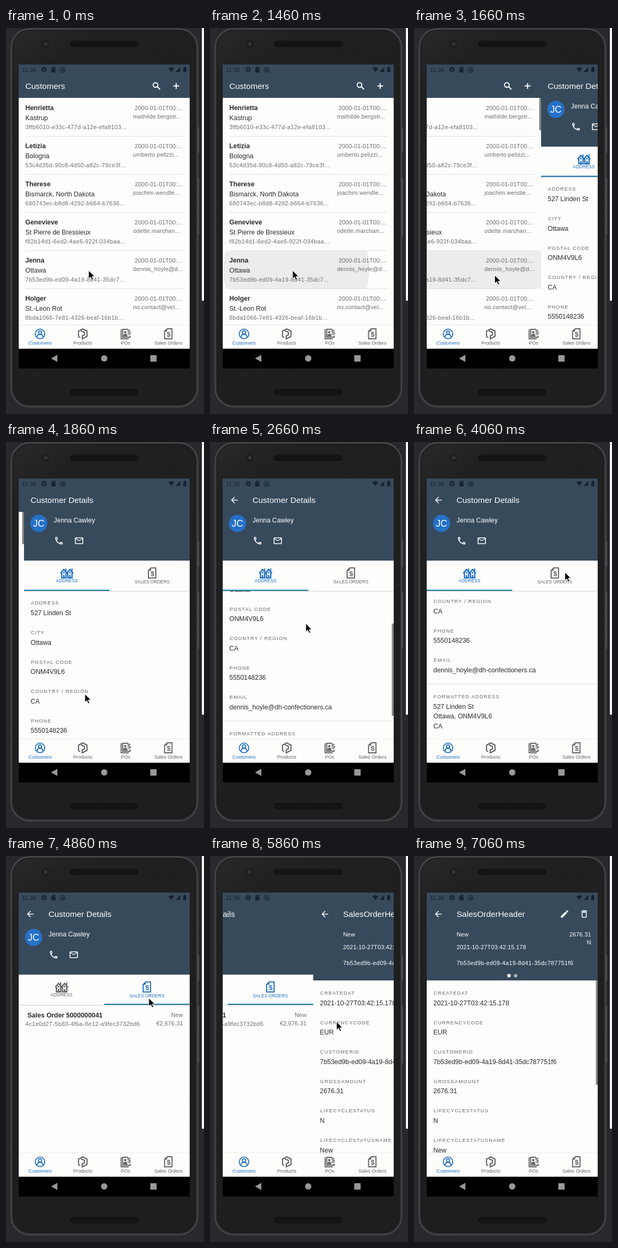
An HTML page that plays this animation: 374 px wide and 729 px high, repeating every 7.4 s.

```html
<!DOCTYPE html>
<html lang="en">
<head>
<meta charset="utf-8">
<title>Customer app demo</title>
<style>
html, body { margin: 0; width: 100%; height: 100%; overflow: hidden; background: #29292d; }
svg { display: block; width: 374px; height: 729px; }
text { font: 12.4px "Liberation Sans", Arial, sans-serif; fill: #2b2b2b; white-space: pre; }
.title { font-size: 15.5px; fill: #fff; }
.bold { font-weight: bold; }
.small { font-size: 11px; letter-spacing: .38px; fill: #6c6d6e; }
.side { font-size: 11px; letter-spacing: .18px; fill: #6c6d6e; }
.label { font-size: 9.4px; letter-spacing: 1.17px; fill: #646566; }
.white { fill: #fff; }
.initials { font-size: 17.5px; fill: #fff; }
.clock { font-size: 11px; fill: #17222d; }
.tab { font-size: 8.5px; fill: currentColor; }
.nav { font-size: 9.1px; fill: currentColor; }
.dollar { font-size: 12.5px; font-weight: bold; fill: currentColor; }
</style>
</head>
<body>
<svg id="stage" viewBox="0 0 374 729"></svg>
<script>
const LOOP = 7400, STEP = 200, LEAD = 60;
const LEFT = 24, TOP = 69, WIDTH = 323, RIGHT = 347;
const NAVY = '#374a5c', PAPER = '#fdfdfc', BLUE = '#1f70c1', GREY = '#626364', INK = '#17222d';

const text = (x, y, s, cls = '', anchor = 'start') =>
  `<text x="${x}" y="${y}" class="${cls}" text-anchor="${anchor}">${s}</text>`;
const rect = (x, y, w, h, fill, more = '') =>
  `<rect x="${x}" y="${y}" width="${w}" height="${h}" fill="${fill}" ${more}/>`;
const circle = (x, y, r, fill, more = '') =>
  `<circle cx="${x}" cy="${y}" r="${r}" fill="${fill}" ${more}/>`;
const ring = (x, y, r, color, w, more = '') =>
  circle(x, y, r, 'none', `stroke="${color}" stroke-width="${w}" ${more}`);
const line = (d, color, w = 2) =>
  `<path d="${d}" fill="none" stroke="${color}" stroke-width="${w}"/>`;
const shape = (d, color) => `<path d="${d}" fill="${color}"/>`;
const group = (id, body) => `<g id="${id}">${body}</g>`;
const at = (x, y, body, scale = 1) => `<g transform="translate(${x} ${y}) scale(${scale})">${body}</g>`;
const clip = (id, x, y, w, h) => `<clipPath id="${id}">${rect(x, y, w, h, '#000')}</clipPath>`;
const clipped = (id, body) => `<g clip-path="url(#${id})">${body}</g>`;
const ripple = (id, x, y, r) => clipped(id + 'Clip', circle(x, y, r, '#ececec', `id="${id}Ripple"`));
const bar = (id, y, h) => rect(RIGHT - 3.5, y, 3.5, h, '#858585', `id="${id}"`);

// Icons on a 24 unit grid, centred on x, y
const GLYPH = {
  back: 'M20 11H7.8l5.6-5.6L12 4l-8 8 8 8 1.4-1.4L7.8 13H20z',
  phone: 'M6.5 5c.1.9.2 1.8.5 2.6L5.8 8.8C5.4 7.6 5.1 6.3 5 5zm9.9 12c.9.3 1.7.4 2.6.5V19c-1.3-.1-2.6-.4-3.8-.8zM7.5 3H4c-.6 0-1 .4-1 1 0 9.4 7.6 17 17 17 .6 0 1-.4 1-1v-3.5c0-.6-.4-1-1-1-1.2 0-2.5-.2-3.6-.6-.3-.1-.7 0-1 .2l-2.2 2.2c-2.8-1.5-5.2-3.8-6.6-6.6l2.2-2.2c.3-.3.4-.7.2-1C8.7 6.5 8.5 5.3 8.5 4c0-.6-.4-1-1-1z',
  mail: 'M22 6a2 2 0 0 0-2-2H4a2 2 0 0 0-2 2v12a2 2 0 0 0 2 2h16a2 2 0 0 0 2-2zm-2 0-8 5-8-5zm0 12H4V8l8 5 8-5z',
  pen: 'M3 17.2V21h3.8L17.8 9.9l-3.7-3.7zM20.7 7a1 1 0 0 0 0-1.4l-2.3-2.3a1 1 0 0 0-1.4 0l-1.8 1.8 3.7 3.7z',
  bin: 'M6 19a2 2 0 0 0 2 2h8a2 2 0 0 0 2-2V7H6zM8 9h8v10H8zM15.5 4l-1-1h-5l-1 1H5v2h14V4z'
};
const icon = (name, x, y) => at(x, y,
  `<path d="${GLYPH[name]}" transform="translate(-12 -12)" fill="#fff" fill-rule="evenodd"/>`, .786);

const docIcon = (x, y) => at(x, y,
  line('M-7-4.5-2-9.5H7V9.5H-7z', 'currentColor', 2) + shape('M-7.5-4.2-2-10v5.8z', 'currentColor') +
  text(.8, 5.8, '$', 'dollar', 'middle'));
const house = x => at(x, 0,
  line('M-6.3.3 0-7 6.3.3M-4-1V8.8H4V-1', 'currentColor', 2.4) + line('M4-3.500V-9', 'currentColor', 2) +
  line('M0 9V3.5', 'currentColor', 2.6) + circle(0, -1, 1.6, 'currentColor'));
const houseIcon = (x, y) => at(x, y, house(-5.7) + house(5.7));

function phone() {
  const speaker = y => rect(121, y, 129, 11.5, '#0d0d0e', 'rx="5.5"') +
    rect(122, y + 1, 127, 9.5, 'url(#mesh)', 'rx="4.5"');
  const button = (y, h) => rect(361.5, y, 3.2, h, '#4a4a4c', 'rx="1"');
  return rect(0, 0, 374, 729, '#29292d') + rect(370, 0, 4, 515, '#f7f7f7') +
    button(187, 49) + button(283, 108) +
    rect(9.5, 1.5, 352.5, 714, '#303032', 'rx="35" stroke="#555557" stroke-width="1.3"') +
    rect(13.5, 4.5, 344.5, 707, 'url(#shell)', 'rx="31" stroke="#161617"') +
    speaker(24) + speaker(682) +
    circle(75, 30, 6, '#252528', 'stroke="#111"') + circle(75, 30, 2.5, '#3a3a3e') +
    rect(LEFT, TOP, WIDTH, 574, '#000');
}

const CUSTOMERS = [
  ['Henrietta', 'Kastrup', '3ffb6010-e33c-477d-a12e-efa8103...', 'mathilde.bergstr...'],
  ['Letizia', 'Bologna', '53c4d35d-90c8-4d50-a82c-79ce3f...', 'umberto.pelizzi...'],
  ['Therese', 'Bismarck, North Dakota', '680743ec-b8d8-4292-b664-b7636...', 'joachim.wendle...'],
  ['Genevieve', 'St Pierre de Bressieux', 'f82b14d1-6ed2-4ae6-922f-034baa...', 'odette.marchan...'],
  ['Jenna', 'Ottawa', '7b53ed9b-ed09-4a19-8d41-35dc7...', 'dennis_hoyle@d...'],
  ['Holger', 'St.-Leon Rot', '8bda1066-7e81-4326-beaf-16b1b...', 'no.contact@vel...']
];

function listPage() {
  const rows = CUSTOMERS.map(([name, city, id, mail], i) => {
    const y = 132.5 + 72 * i;
    return text(36.5, y + 22.5, name, 'bold') + text(36.5, y + 41.5, city) +
      text(36.5, y + 58.5, id, 'small') + text(333.5, y + 22.5, '2000-01-01T00:...', 'side', 'end') +
      text(240, y + 38.5, mail, 'side') + rect(37, y + 71.5, 298, 1, '#dfdfdf');
  }).join('');
  return rect(LEFT, 132, WIDTH, 430, PAPER) + ripple('row', 163, 456, 138) + rows +
    rect(LEFT, TOP, WIDTH, 63, NAVY) + text(36.5, 115, 'Customers', 'title') +
    line('M286.2 111.2 291 116', '#fff', 2.2) + ring(282.4, 107.6, 4.4, '#fff', 1.9) +
    line('M316 109.5h11M321.5 104v11', '#fff') + bar('listBar', 132, 61);
}

const fields = (list, top) => list.map(([label, value], i) => {
  const y = top + 55.6 * i;
  return text(37, y + 3.4, label, 'label') + text(36.5, y + 23, value);
}).join('');

function detailPage() {
  const address = fields([
    ['ADDRESS', '527 Linden St'], ['CITY', 'Ottawa'], ['POSTAL CODE', 'ONM4V9L6'],
    ['COUNTRY / REGION', 'CA'], ['PHONE', '5550148236'],
    ['EMAIL', 'dennis_hoyle@dh-confectioners.ca']], 304) +
    rect(LEFT, 626.5, WIDTH, 1, '#dedede') + text(37, 654.4, 'FORMATTED ADDRESS', 'label') +
    ['527 Linden St', 'Ottawa, ONM4V9L6', 'CA'].map((s, i) => text(36.5, 673.7 + 18.4 * i, s)).join('');
  const orders = ripple('order', 220, 307, 125) +
    text(182.5, 304.5, 'Sales Order 5000000041', 'bold', 'end') +
    text(36.5, 321, '4c1e0d27-5b83-4f6a-8e12-a9fec3732bd6', 'small') +
    text(334.5, 304, 'New', 'side', 'end') + text(334.5, 320, '€2,676.31', 'side', 'end');
  return rect(LEFT, 224, WIDTH, 338, PAPER) +
    clipped('bodyClip', group('address', address) + group('orders', orders)) +
    bar('detailBar', 281, 174) +
    rect(LEFT, 224, WIDTH, 57, PAPER) + rect(LEFT, 281, WIDTH, 1.5, '#000', 'opacity=".13"') +
    ripple('tab', 275, 250, 62) +
    group('tabA', houseIcon(105, 247.7) + text(104.8, 265.2, 'ADDRESS', 'tab', 'middle')) +
    group('tabB', docIcon(266, 247.3) + text(266, 267, 'SALES ORDERS', 'tab', 'middle')) +
    rect(LEFT, 279, 161.5, 2.2, '#1f7ba3', 'id="marker"') +
    rect(LEFT, TOP, WIDTH, 155, NAVY) +
    group('detailBack', icon('back', 46, 109.7)) +
    group('detailTitle', text(80.3, 115, 'Customer Details', 'title')) +
    circle(52, 153.7, 16.2, '#2571c8') + text(52, 160, 'JC', 'initials', 'middle') +
    text(80.3, 151.7, 'Jenna Cawley', 'white') + icon('phone', 90, 186.5) + icon('mail', 128, 186.5);
}

function orderPage() {
  const stamp = '2021-10-27T03:42:15.178', id = '7b53ed9b-ed09-4a19-8d41-35dc787751f6';
  return rect(LEFT, 235, WIDTH, 327, PAPER) +
    fields([['CREATEDAT', stamp], ['CURRENCYCODE', 'EUR'], ['CUSTOMERID', id],
      ['GROSSAMOUNT', '2676.31'], ['LIFECYCLESTATUS', 'N'], ['LIFECYCLESTATUSNAME', 'New']], 258.5) +
    bar('orderBar', 235, 197) + rect(LEFT, TOP, WIDTH, 166, NAVY) +
    icon('back', 46, 109.7) + text(80.5, 115, 'SalesOrderHeader', 'title') +
    icon('pen', 284.5, 109.5) + icon('bin', 321.5, 109.5) +
    text(80.5, 151.5, 'New', 'side white') + text(80.5, 176.3, stamp, 'side white') +
    text(80.5, 206.3, id, 'small white') + text(334.5, 151.5, '2676.31', 'side white', 'end') +
    text(334.5, 167.3, 'N', 'side white', 'end') +
    circle(179.5, 226, 3.3, '#fff') + circle(192, 226, 3.3, '#a9b0b6');
}

function chrome() {
  const status = rect(LEFT, TOP, WIDTH, 18, NAVY) + text(30, 82.7, '11:36', 'clock') +
    ring(72, 78.7, 2.9, INK, 2) + ring(72, 78.7, 4.5, INK, 1.6, 'stroke-dasharray="2.3 2.41"') +
    shape('M88 73.5h5.5V84h-8V76z', INK) + line('M88.5 75v2M90.3 75v2M92 75v2', NAVY, .8) +
    ring(107, 78.7, 4.7, INK, 1.2) + ring(107, 78.7, 1.8, INK, 1.2) + line('M108.5 80.2 111 82.5', INK, 1.2) +
    shape('M306.8 76.2q5.5-4 11 0L312.3 83zM329 74v9h-9z', INK) +
    shape('M334.8 74.5h1.5v-1.2h2.6v1.2h1.5v9h-5.600z', INK);

  const person = ring(64.3, 575, 3.1, BLUE, 1.8) + line('M58.8 583.5q.5-5 5.5-5t5.5 5', BLUE, 1.8) +
    ring(64.3, 577.7, 9, BLUE, 1.8);
  const cube = line('M140 585 137 582.5V572.5L145 568.3 153 572.5V582.5L144 587V581.500L148 579.500V574.500L141.500 572', GREY, 2.1);
  const stack = line('M217.5 569V587H232M231 569H220.5V584H234.5V581', GREY, 2) +
    circle(225.3, 574.5, 2.2, GREY) + shape('M221.5 582.5q0-5 4-5t4 5z', GREY) +
    text(232.5, 579, '$', 'dollar', 'middle');
  const labels = [['Customers', 64.3], ['Products', 145], ['POs', 226], ['Sales Orders', 306.7]]
    .map(([s, x], i) => `<g color="${i ? GREY : BLUE}">${text(x, 597.5, s, 'nav', 'middle')}</g>`).join('');
  const nav = rect(LEFT, 560.5, WIDTH, 45.2, PAPER) + rect(LEFT, 560.5, WIDTH, .8, '#e6e6e6') +
    `<g color="${GREY}">${person}${cube}${stack}${docIcon(306.5, 577.5)}</g>` + labels;
  const system = shape('M85 624l12-6.8v13.6z', '#989898') + circle(185.5, 624, 6, '#989898') +
    rect(272.5, 618, 12, 12, '#989898');
  return status + nav + system;
}

const stage = document.getElementById('stage');
stage.innerHTML = `<defs>
  <pattern id="mesh" width="3" height="3" patternUnits="userSpaceOnUse">${circle(1.5, 1.5, .8, '#333335')}</pattern>
  <linearGradient id="shell" x2=".3" y2="1"><stop stop-color="#29292a"/><stop offset=".14" stop-color="#202021"/><stop offset="1" stop-color="#1e1e1e"/></linearGradient>
  ${clip('screenClip', LEFT, TOP, WIDTH, 536)}${clip('rowClip', LEFT, 420.5, WIDTH, 71.5)}
  ${clip('bodyClip', LEFT, 281, WIDTH, 281)}${clip('orderClip', LEFT, 282, WIDTH, 52)}
  ${clip('tabClip', 185.5, 224, 161.5, 57)}</defs>` + phone() +
  clipped('screenClip', group('list', listPage()) + group('detail', detailPage()) + group('order', orderPage())) +
  chrome() +
  group('cursor', '<path d="M0 0V15.5L3.7 12.2 6.3 18 8.9 16.9 6.3 11.2H11.3z" fill="#050505" stroke="#fff" stroke-width=".9"/>');

const el = {};
stage.querySelectorAll('[id]').forEach(n => el[n.id] = n);
const move = (n, x, y = 0) => n.setAttribute('transform', `translate(${x} ${y})`);
const show = (n, on) => n.setAttribute('visibility', on ? 'inherit' : 'hidden');

// Piecewise linear value from [time, value, ...] keys
function track(keys, t, k = 1) {
  let a = keys[0];
  for (const b of keys) {
    if (t < b[0]) return a[k] + (b[k] - a[k]) * (t - a[0]) / (b[0] - a[0]);
    a = b;
  }
  return a[k];
}
// Eased travel across one page, in whole pixels
function slide(t, start, len) {
  const p = Math.min(1, Math.max(0, (t - start) / len));
  return Math.round(WIDTH * (.5 - Math.cos(p * Math.PI) / 2));
}
const MOUSE = [[0, 156, 458], [1460, 156, 458], [1860, 149, 476], [2060, 150, 480], [2260, 154, 474],
  [2660, 181, 343], [2860, 190, 290], [3460, 255, 260], [4060, 285, 246], [4660, 285, 246], [5260, 239, 313]];
const SCROLL = [[0, 0], [2260, 0], [2460, 42], [2660, 100], [2860, 158], [3060, 170]];

function draw(ms) {
  const t = ms < LEAD ? 0 : LEAD + STEP * Math.floor((ms - LEAD) / STEP);
  const open = slide(t, 1504, 400), next = slide(t, 5675, 385);
  const swap = slide(t, 4330, 260), scroll = track(SCROLL, t);
  const onOrders = swap > WIDTH * .3;

  move(el.list, -open);
  move(el.detail, WIDTH - open - next);
  move(el.order, WIDTH - next);
  show(el.list, open < WIDTH);
  show(el.detail, open > 0 && next < WIDTH);
  show(el.order, next > 0);

  show(el.rowRipple, t === 1460 || t === 1660);
  el.rowRipple.setAttribute('r', t > 1460 ? 240 : 138);
  show(el.listBar, open > 0);

  show(el.detailBack, open === WIDTH);
  move(el.detailTitle, open === WIDTH ? 0 : -43.8);
  move(el.address, -swap, -scroll);
  move(el.orders, WIDTH - swap);
  move(el.detailBar, 0, scroll * .62);
  el.detailBar.setAttribute('opacity', t < 3260 ? 1 : t < 3460 ? .5 : 0);
  move(el.marker, swap / 2);
  el.tabA.style.color = onOrders ? GREY : BLUE;
  el.tabB.style.color = onOrders ? BLUE : GREY;
  show(el.tabRipple, t === 4260);
  show(el.orderRipple, t === 5460);

  move(el.cursor, track(MOUSE, t), track(MOUSE, t, 2));
  show(el.cursor, t < 6460);
}

const start = performance.now();
function tick() {
  draw((performance.now() - start) % LOOP);
  requestAnimationFrame(tick);
}
tick();
</script>
</body>
</html>
```
